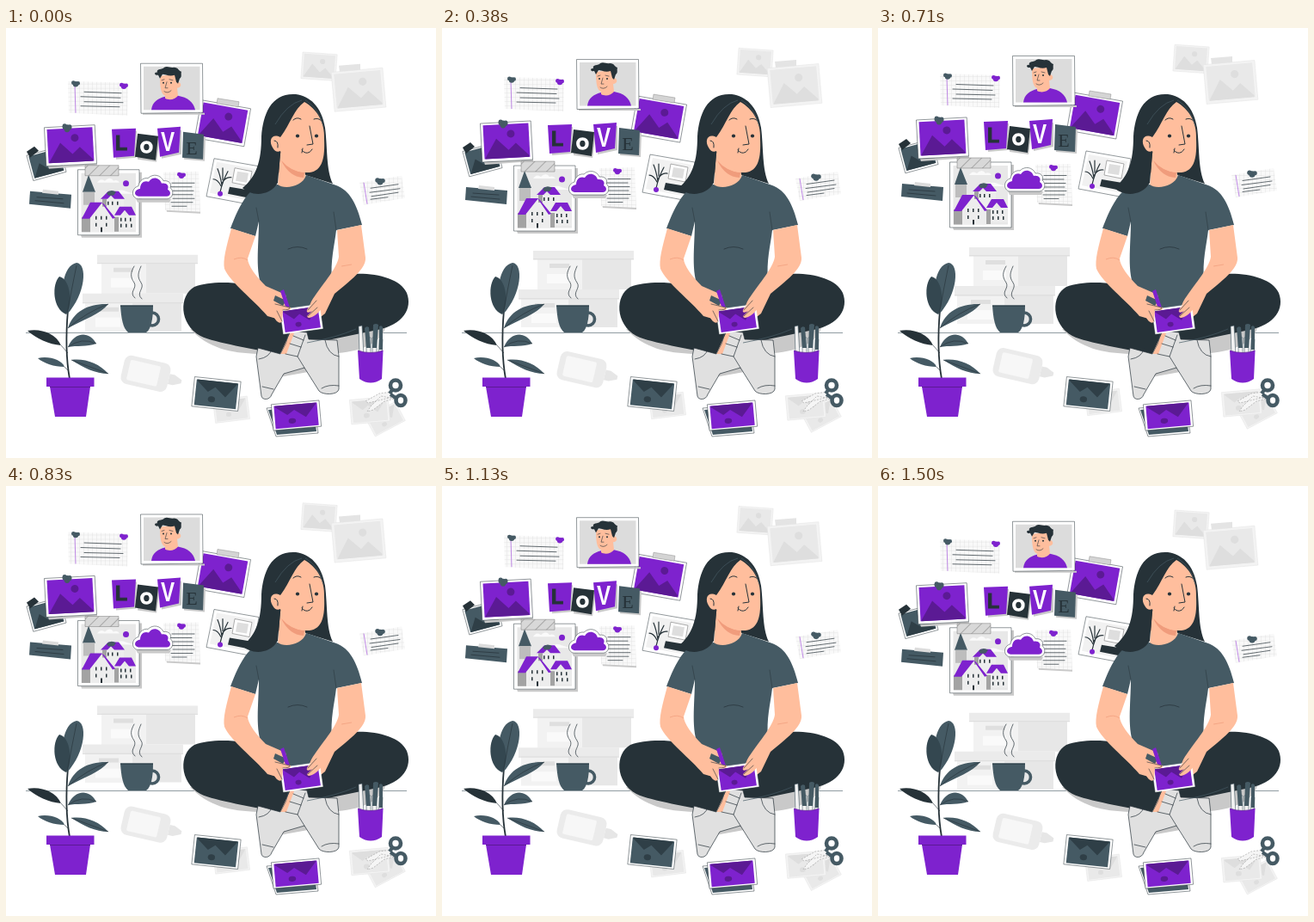
An HTML page for the animation above (1.54 s loop, 500 px wide and 500 px high).

```html
<!DOCTYPE html>
<html lang="en">
<head>
<meta charset="utf-8">
<title>Scrapbook</title>
<style>
  html, body { margin: 0; height: 100%; overflow: hidden; background: #fff; }
  svg { display: block; width: 100vw; height: 100vh; }
  .purple { --c: #7e22ce; --m: #5b1a94; }
  .slate { --c: #455a64; --m: #2f3f47; }
  .pale { --f: #f3f3f3; --c: #e9e9e9; --m: #dedede; --s: #e2e2e2; }
  .p { fill: #7e22ce; } .d { fill: #263238; } .g { fill: #455a64; } .skin { fill: #ffbe9d; }
  .paper { fill: #fff; stroke: #263238; stroke-width: .5; }
  .line { fill: none; stroke: #263238; stroke-linecap: round; stroke-linejoin: round; }
  .shade { fill: #c9c9c9; }
</style>
</head>
<body>
<svg viewBox="0 0 500 500" stroke-width=".7">
  <defs>
    <g id="photo">
      <rect x="-30" y="-23" width="60" height="46" stroke-width=".5" vector-effect="non-scaling-stroke" style="fill:var(--f,#fff);stroke:var(--s,#263238)"/>
      <rect x="-27" y="-20.5" width="54" height="40" style="fill:var(--c)"/>
      <path d="M-26 18.500L-12-4 2 10 11 2 26 17.500V19.500H-26Z" style="fill:var(--m)"/>
      <circle cx="5.500" cy="-9" r="4.600" style="fill:var(--m)"/>
    </g>
    <g id="pin"><circle r="3.2"/><circle cx="-2.6" cy="-1.6" r="2.4"/><circle cx="2.8" cy="-1" r="2.2"/></g>
    <pattern id="grid" width="5" height="5" patternUnits="userSpaceOnUse">
      <path fill="#f9f9f9" d="M0 0H5V5H0Z"/><path d="M0 0H5M0 0V5" stroke="#e0e0e0" stroke-width=".9"/>
    </pattern>
    <pattern id="stripes" width="9" height="9" patternUnits="userSpaceOnUse" patternTransform="rotate(-45)">
      <path fill="#d8d8d8" d="M0 0H9V9H0Z"/><path d="M0 0H9" stroke="#777" stroke-width="1"/>
    </pattern>
  </defs>

  <g id="float">
    <!-- pale photos -->
    <g class="pale">
      <use href="#photo" transform="translate(364 45) rotate(4) scale(.67)"/>
      <use href="#photo" transform="translate(410 72) rotate(-5)"/>
      <path d="M387 44L412 42V49L388 51Z" fill="#e4e4e4"/>
      <use href="#photo" transform="translate(262 444) rotate(173) scale(.67 .58)"/>
      <use href="#photo" transform="translate(441 455) rotate(152) scale(.66 .54)"/>
      <use href="#photo" transform="translate(423 445) rotate(175) scale(.75 .62)"/>
    </g>

    <!-- grid note, top left -->
    <path d="M72 62L142 64 141 102 73 99Z" fill="url(#grid)"/>
    <path d="M80 67L81 99" stroke="#a95be0" fill="none"/>
    <path class="line" d="M91 74.500L134 76M87 80L133 81.500M91 86L136 87M87 91L132 92"/>
    <use href="#pin" class="g" x="81" y="65.500"/><use href="#pin" class="p" x="137" y="68"/>

    <!-- purple photo and portrait -->
    <g class="purple"><use href="#photo" transform="translate(252 111) rotate(10) scale(.97)"/></g>
    <path d="M246 82L271 86 270 92 245 88Z" fill="#d4d4d4" stroke="#777" stroke-width=".4"/>
    <path class="shade" d="M159 99H231V101H159Z"/>
    <path class="paper" d="M156.500 41.500H228.500L229 98.500 157 99.500Z"/>
    <path d="M160 45H225.500V95.500H160Z" fill="#dcdcdc"/>
    <path class="p" d="M169 95.500C170 86 177 82 185 80L200 79C211 81 218 86 220 95.500Z"/>
    <path class="skin" d="M179 56C179 69 180 77 185 79L185 82C190 85 197 83 200 79L199 70C204 70 205 64 200 63L199 54Z"/>
    <path class="d" d="M179 59L177 55C172 56 172 51 176 52 174 47 182 49 184 46 188 44 191 47 195 46 201 46 200 50 204 51 203 54 205 57 202 59L200 65 198 63 196 55C190 57 185 54 182 54Z"/>
    <path class="line" stroke-width=".6" d="M181 61L184 60M190 60L194 61M187 63L185 70H188M184 74Q188 77 192 73"/>
    <circle class="d" cx="183" cy="64" r="1"/><circle class="d" cx="192" cy="64" r="1"/>

    <!-- photos on the left -->
    <g class="slate"><use href="#photo" transform="translate(47 158) rotate(-15) scale(.66 .66)"/></g>
    <path class="d" d="M24 144L33 138 38 143 28 151Z"/>
    <path class="shade" d="M49 161L106 158V160L50 164Z"/>
    <g class="purple"><use href="#photo" transform="translate(75 137) rotate(-3) scale(.98)"/></g>
    <use href="#pin" class="g" transform="translate(71 117) scale(1.1 1.4)"/>

    <!-- letters -->
    <path class="shade" d="M126 122L152 120 151 151 128 153ZM154 126L179 129 175 156 153 153ZM179 121L204 119 204 147 181 152ZM208 125L232 127 231 155 207 153Z"/>
    <path class="p" d="M123 118L151 117 149 149 125 151ZM176 117L203 115 201 145 179 150Z"/>
    <path class="d" d="M153 123L177 126 174 154 150 150Z"/>
    <path class="g" d="M206 121L230 124 229 153 205 151Z"/>
    <g text-anchor="middle" font-family="Arial, 'Liberation Sans', sans-serif" font-weight="700">
      <text x="134" y="142" font-size="23" fill="#263238" stroke="#263238" stroke-width="1">L</text>
      <text x="163.500" y="145.500" font-size="19" fill="#fff" stroke="#fff" stroke-width="1.300">O</text>
      <text transform="translate(188 143) scale(.78 1)" font-size="31" fill="#fff">V</text>
      <text x="216" y="147" font-size="22" font-weight="400" font-family="'Liberation Serif', serif" fill="#263238">E</text>
    </g>

    <!-- house picture -->
    <path class="shade" d="M87 241H155V168H158V244H88Z"/>
    <path class="paper" d="M83.500 165H155V241H83.500Z"/>
    <path d="M87.500 169H151V237.500H87.500Z" fill="#e8e8e8"/>
    <path d="M106 180Q110 174 115 178 121 172 125 178 130 176 132 180ZM126 191Q133 187 139 190L149 193H125Z" fill="#fafafa"/>
    <path class="g" d="M96 171L104 191H89Z"/>
    <path d="M90 191H103V206H90Z" fill="#bdbdbd"/>
    <path d="M112 199H137V218H112ZM127 218H150.500V235H127ZM97 222L111 205 126 222V237.500H97Z" fill="#ededed"/>
    <path d="M88 220H98V237.500H88ZM126 220H131V237H126ZM112 199H117V208H112Z" fill="#a3a3a3"/>
    <path class="p" d="M98 203H112L97 222H88ZM111 203L114 205 127 221 124 222ZM110 199L119 190H131L138 199H126L122 195 118 199ZM126 218L132 208H146L151 218H143L138 212 133 218Z"/>
    <path class="g" d="M117 192Q122 187 128 191L125 195H119Z"/>
    <path class="d" d="M104 219h1.500v4h-1.500ZM110 219h1.500v4h-1.500ZM116 219h1.500v4h-1.500ZM104 227h1.500v4h-1.500ZM116 227h1.500v4h-1.500ZM110 232h2v5.500h-2ZM118 202h1.500v4h-1.500ZM123 202h1.500v4h-1.500ZM129 202h1.500v4h-1.500ZM133 221h1.500v4h-1.500ZM138 221h1.500v4h-1.500ZM144 221h1.500v4h-1.500ZM133 228h1.500v4h-1.500ZM139 228h1.500v4h-1.500ZM145 228h1.500v4h-1.500Z"/>
    <circle class="p" cx="139.500" cy="181" r="3.500"/>
    <path d="M92 160H131V172H92Z" fill="url(#stripes)" stroke="#777" stroke-width=".5"/>

    <!-- list note -->
    <path class="shade" d="M186 210L226 213V216L187 214Z"/>
    <path d="M183 168L224 167 226 214 185 212Z" fill="url(#grid)"/>
    <path class="line" d="M193 180.500H219M191 185H216M194 189.500H218M191 194H217M194 198.500H219M192 203H217M193 207.500H210"/>
    <use href="#pin" class="p" x="204" y="172"/>

    <!-- cloud sticker -->
    <path class="shade" d="M151 199H192L190 203H153Z"/>
    <path class="paper" d="M153 199C145 197 146 186 154 184 155 177 161 174 165 175 171 169 180 171 183 178 190 177 193 182 191 186 196 190 194 198 188 199Z"/>
    <path class="p" d="M154 196C148 195 149 188 156 187 156 180 161 177 166 179 170 172 179 174 181 181 187 180 190 184 188 188 193 191 191 196 187 196Z"/>

    <!-- interior photo -->
    <path class="paper" d="M242 152L294 161 286 206 233 196Z"/>
    <path d="M245 156L290 164 284 201 237 192Z" fill="#f1f1f1"/>
    <path d="M266 163L286 167 283 184 263 180Z" fill="#fff" stroke="#777" stroke-width=".6"/>
    <path d="M269 167L282 169 280 180 267 178Z" fill="#dedede"/>
    <path class="line" stroke-width="1.200" d="M249 191Q252 178 258 167M251 183Q249 171 246 164M251 181Q255 173 262 174M250 184Q246 176 241 176M252 177L252 163"/>
    <circle class="p" cx="249" cy="193" r="3"/>
    <path class="d" d="M260 185L290 190 288 199 258 193Z"/>

    <!-- slate label -->
    <path class="g" d="M28 190L76 194 75 210 27 205Z"/>
    <path d="M43 188L61 190V194L42 192Z" fill="#dcdcdc"/>
    <path class="line" d="M36 197L66 199M34 201L67 204"/>

    <!-- grid note, right -->
    <path d="M411 180L460 172 464 198 416 206Z" fill="url(#grid)"/>
    <path d="M416 180L420 205" stroke="#a95be0"/>
    <path class="line" d="M424 186.500L456 182M423 191.500L458 187M425 196L456 191.500M424 199.500L444 197"/>
    <use href="#pin" class="g" transform="translate(435 179) scale(1.150)"/>

    <!-- boxes -->
    <path d="M111 273H220V309H111ZM92 319H204V353H92Z" fill="#e7e7e7"/>
    <path d="M111 273H163V309H111ZM92 319H147V353H92Z" fill="#f2f2f2"/>
    <path d="M106 264H223V273H106ZM89 309H206V319H89Z" fill="#ebebeb"/>
    <path d="M106 273H223V274.500H106ZM89 319H206V320.500H89ZM125 279H148V284H125ZM108 325H131V330H108Z" fill="#dfdfdf"/>
    <path d="M122 291H149V302H122ZM104 337H133V348H104Z" fill="#fafafa"/>

    <!-- glue bottle -->
    <g transform="translate(162 402) rotate(13)">
      <rect x="-27" y="-17" width="55" height="34" rx="8" fill="#ebebeb"/>
      <rect x="-20" y="-12" width="36" height="24" rx="2" fill="#f7f7f7"/>
      <path d="M28-6H34L43-2V2L34 6H28Z" fill="#e6e6e6"/>
    </g>
  </g>

  <path d="M23 354.500H466" stroke="#455a64" stroke-width=".6"/>

  <!-- plant -->
  <path fill="none" stroke="#263238" stroke-width="1.800" d="M74 408Q68 375 72 328"/>
  <path class="g" d="M71 333C61 309 66 276 82 273 95 274 93 309 71 333ZM72 349C78 329 97 320 119 321 109 333 92 338 72 349ZM72 371C79 354 96 351 105 367 94 371 82 369 72 371ZM76 386C92 384 108 390 119 402 104 402 90 395 76 386Z"/>
  <path d="M70 333C54 327 53 298 62 289 73 291 79 316 70 333Z" fill="#344750"/>
  <path class="d" d="M25 352C40 349 58 355 64 369 50 368 35 361 25 352Z"/>
  <path class="g" d="M37 384C50 381 65 386 68 394 56 394 44 390 37 384Z"/>
  <path fill="none" stroke="#263238" stroke-width=".6" d="M71 333Q76 305 82 276M72 349Q94 330 119 321M72 371Q88 359 105 367M76 386L119 402M64 369L72 378M68 394L73 399"/>
  <path class="p" d="M47 406.500H102.500V417H47ZM51 417H98L93 452H57Z"/>
  <path d="M51 417H98V418H51Z" fill="#5b1a94"/>

  <!-- mug -->
  <circle cx="170" cy="338.500" r="7.500" fill="none" stroke="#455a64" stroke-width="3.600"/>
  <path class="g" d="M133 322.500H171C171 338 169 350 163 354H142C136 349 134 338 133 322.500Z"/>
  <path d="M133 322.500H171V324H133Z" fill="#344750"/>
  <path class="line" d="M150 314C142 307 153 303 149 296 144 289 145 284 149 277M158 315C150 308 162 303 157 296 152 289 154 284 157 277"/>

  <!-- shadow, trousers and socks -->
  <path class="shade" d="M214 350C235 372 260 378 294 379L312 407 368 397 386 378C415 376 437 364 441 349Z"/>
  <path class="d" d="M304 303C268 294 238 294 219 301 201 311 201 344 226 358 245 367 286 372 318 380L334 356 350 368 432 351C462 345 473 326 466 308 456 286 410 281 378 290Z"/>
  <path d="M293 372L319 379 333 352 350 354 352 362 385 363 387 381V420C386 427 368 427 364 422L347 395 323 402 309 426C307 433 298 433 297 428L291 382Z" fill="#e0e0e0" stroke="#263238"/>
  <path class="skin" d="M319 379L331 353 335 355 326 379Z"/>
  <path class="line" d="M348 357L339 382 325 379M334 358L346 363M330 367L343 371M339 382L347 395M294 385Q307 383 309 373M371 363Q374 380 387 382M298 417L311 420M367 419Q375 414 387 416"/>
  <path fill="none" stroke="#455a64" d="M293 313Q309 320 315 333M319 379Q327 367 329 354M350 366Q384 360 407 350"/>

  <!-- head, shirt and arms -->
  <path class="d" d="M337 77C309 75 299 99 297 126L318 170 348 171 380 181C372 165 374 139 371 116 367 91 353 79 337 77Z"/>
  <path class="skin" d="M319 145L316 184C324 190 339 189 350 180L347 165Z"/>
  <path class="g" d="M316 182C301 183 287 186 281 194 272 205 266 220 261 233L290 242 294 225C294 253 289 286 299 303L318 326H366L379 294C377 270 382 253 384 235L414 229C408 205 400 189 384 183L349 171C345 185 323 188 316 182Z"/>
  <path class="line" stroke-width=".5" d="M294 225L291 209M384 235L381 214"/>
  <path class="line" d="M328 257Q339 252 350 257"/>
  <path class="skin" d="M262 233C256 255 252 270 254 280 261 296 289 317 304 335L318 339 329 327 325 310 302 300C291 289 281 276 281 268L290 242ZM385 235L387 266C385 280 366 300 355 318L349 332 358 342 371 332 382 309C400 294 419 280 418 267L413 229Z"/>
  <path fill="none" stroke="#f09c7c" d="M265 269Q274 265 281 270M390 277L402 275"/>
  <path class="d" d="M320 120L297 126C297 155 291 173 275 186 285 196 307 196 316 180L319 146Z"/>
  <path d="M320 154Q331 167 347 168L346 174Q329 173 320 154Z" fill="#f09c7c"/>
  <path class="skin" d="M347 86C335 94 331 111 319 127 309 122 305 131 310 139 313 145 317 144 319 143 322 161 338 169 353 168 368 166 371 151 370 129 371 109 361 94 347 86Z"/>
  <path class="line" stroke-width="1" d="M334 107Q338 103 343 106M358 106Q363 104 367 108M353 114L357 135 350 136M344 142C348 147 353 146 356 141M345 140L344 145M312 131Q317 131 316 139"/>
  <circle class="d" cx="339" cy="125.500" r="2.100"/><circle class="d" cx="361" cy="125.500" r="2.100"/>
  <path fill="none" stroke="#455a64" d="M344 84Q327 88 313 112M348 84Q364 93 369 114"/>

  <!-- hands at work -->
  <path d="M313 311L326 317 322 323 311 317Z" class="g"/>
  <path class="p" d="M319 306L323 304 330 325 326 327Z"/>
  <g class="purple"><use href="#photo" transform="translate(343.500 338.500) rotate(172) scale(.77 .62)" style="--s:#fff"/></g>
  <path class="skin" d="M302 318L318 322 331 325C332 328 328 329 322 328L321 341C319 345 314 341 312 337L303 333ZM369 306L360 316 351 326C348 331 351 332 356 329L350 335C351 339 357 336 362 332L372 321Z"/>
  <path class="line" stroke-width=".6" d="M313 321L330 325Q330 328 322 328M315 329L321 341M361 317L351 328M362 325L351 335"/>

  <!-- pencil pot -->
  <path d="M410 347L414 346 416 380H411ZM419 360H424V380H419ZM426 360H431V380H426ZM434 362H438L437 380H433Z" fill="#f2f2f2" stroke="#455a64" stroke-width=".6"/>
  <path class="g" d="M417 349Q419 346 422 348L424 372H419ZM427 345Q430 343 433 345L431 372H426ZM434 347Q437 345 438 348L438 374H434Z"/>
  <path class="p" d="M409 375Q424 380 438.500 375L437 408Q424 417 411 408Z"/>
  <path d="M409 375Q424 380 438.500 375" fill="none" stroke="#5b1a94"/>

  <!-- photos on the floor -->
  <g class="slate"><use href="#photo" transform="translate(244.500 425.500) rotate(186) scale(.9 .75)"/></g>
  <path class="paper" d="M303 442L358 438 363 471 314 475Z"/>
  <path class="g" d="M305 444L357 440 361 469 315 473Z"/>
  <g class="purple"><use href="#photo" transform="translate(337.500 450.500) rotate(175) scale(.93 .66)"/></g>

  <!-- scissors -->
  <path d="M449 423L434 425 418 434 421 436 450 429ZM452 431L436 428 424 440 420 446 427 444 440 434Z" fill="#f5f5f5" stroke="#9a9a9a" stroke-width=".6" stroke-dasharray="2 1.500"/>
  <g fill="none" stroke="#455a64" stroke-width="4.600">
    <circle cx="453" cy="415.500" r="6"/><ellipse cx="459" cy="433" rx="5.500" ry="6"/>
    <path stroke-width="4" d="M449 421L446 425M453 430L447 426"/>
  </g>
</svg>
<script>
  const LOOP = 1540, RISE = 9.5, LEAD = 20;
  const float = document.getElementById('float');
  function draw() {
    const phase = ((performance.now() + LEAD) % LOOP) / LOOP;
    const lift = RISE * (1 - Math.abs(1 - 2 * phase));
    float.setAttribute('transform', `translate(0 ${-lift})`);
    requestAnimationFrame(draw);
  }
  draw();
</script>
</body>
</html>
```
